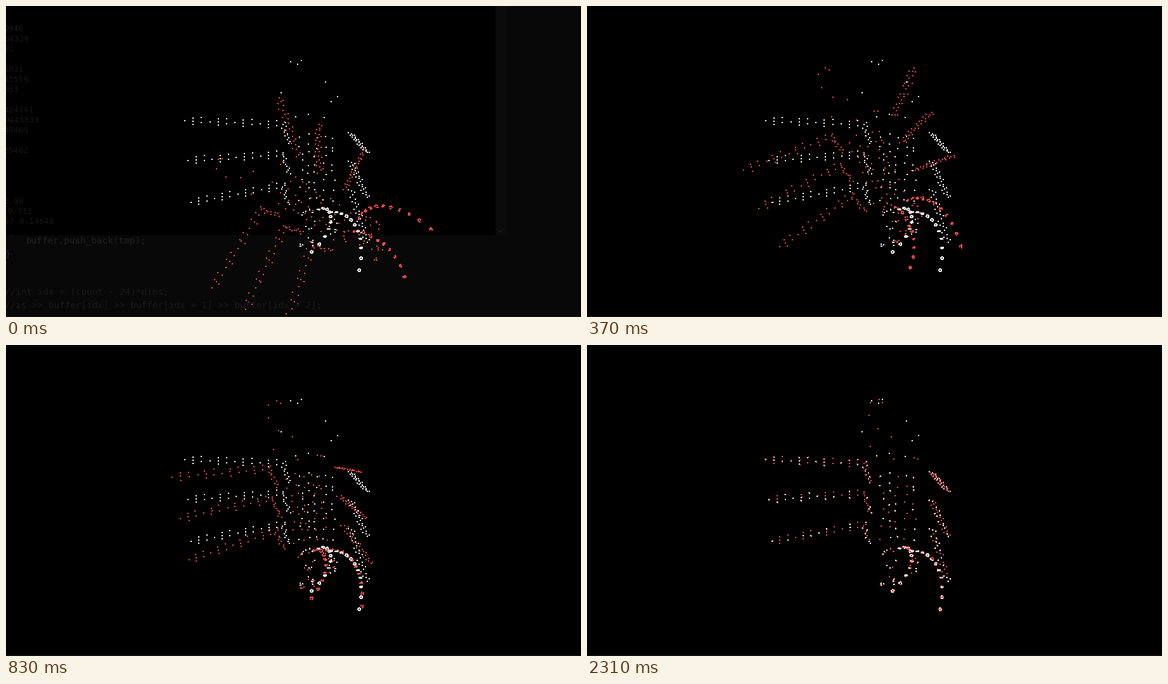
Recreate the animation shown at these times as a matplotlib script. Size 907 by 491 pixels, loop 2390 ms.

```python
import numpy as np
import matplotlib.pyplot as plt
from matplotlib.animation import FuncAnimation

W, H, DPI = 907, 491, 128
TICK, LOOP = 10, 2390
WHITE, RED = (255, 255, 255), (240, 76, 76)
CHANGES = [70, 140, 200, 290, 370, 430, 520,
           600, 670, 750, 830, 910, 980, 1060,
           1150, 1230, 1300]
rng = np.random.default_rng(4)

# Pose of the moving cloud at key steps: the two rows of its 2x3 projection,
# the sideways sag of the lower part, and where the pivot lies.
PIVOT = np.array([430, 260, 0])
KEYS = np.array([0, 3, 5, 9, 14], float)
POSES = np.array([
    [0.467, 0.785, 0.57, -0.83, 0.58, 0.76, 0.22, 457, 369],
    [0.80, 0.458, 0.10, -0.51, 0.897, 1.00, 0.22, 412, 302],
    [0.88, 0.307, 0.00, -0.388, 0.971, 0.82, 0.19, 402, 279],
    [0.95, 0.209, -0.10, -0.259, 1.028, 0.37, 0.06, 406, 277],
    [1, 0, 0, 0, 1, 0, 0, 430, 260]])
SLOPES = np.gradient(POSES, KEYS, axis=0, edge_order=2)
SLOPES[-1] = 0


def pose_at(step):
    """Cubic Hermite path through the key poses."""
    if step >= KEYS[-1]:
        return POSES[-1]
    k = np.searchsorted(KEYS, step, side="right") - 1
    h = KEYS[k + 1] - KEYS[k]
    u = (step - KEYS[k]) / h
    return ((1 + 2 * u) * (1 - u) ** 2 * POSES[k]
            + u * (1 - u) ** 2 * h * SLOPES[k]
            + u * u * (3 - 2 * u) * POSES[k + 1]
            + u * u * (u - 1) * h * SLOPES[k + 1])


def project(points, pose):
    xy = (points - PIVOT) @ pose[:6].reshape(2, 3).T + pose[7:]
    xy[:, 0] += pose[6] * np.maximum(points[:, 1] - 270, 0)
    return xy


# How white and red stack where the clouds coincide.
RED_OVER, WHITE_OVER, WHITE_FIRST = 0, 1, 2
RIBS = [(0,), (-5, 0, 5), (-6, 2)]


def finger(tip, root, side, stations=12):
    """Ribs of one to three points along an axis, spread along side."""
    tip, root, side = np.array(tip), np.array(root), np.array(side)
    return [tip + s * (root - tip) + off * side
            for i, s in enumerate(np.linspace(0, 1, stations))
            for off in RIBS[i % 3]]


def knuckle(x, y):
    """Loose column of points at the root of a finger."""
    rows = np.arange(-4, 30, 3)
    return [(x + rng.uniform(-4, 4) + max(r, 0) * 0.3, y + r, 0) for r in rows]


def arm(p0, p1, p2, p3, count, depth):
    """Small rings along a cubic curve, some of them seen edge-on."""
    points = []
    for i, t in enumerate(np.linspace(1, 0, count)):
        x, y = ((1 - t) ** 3 * np.array(p0) + 3 * t * (1 - t) ** 2 * np.array(p1)
                + 3 * t * t * (1 - t) * np.array(p2) + t ** 3 * np.array(p3))
        tall = 2 * abs(np.cos(i * 0.5))
        points += [(x + 2 * np.cos(a), y + tall * np.sin(a), depth(t))
                   for a in np.arange(7) * 2 * np.pi / 7 + 0.4]
    return points


def palm():
    """Jittered columns between the fingers."""
    return [(x + rng.uniform(-3, 3), y + rng.uniform(-5, 5), 0)
            for x in (465, 476, 488, 502, 516) for y in range(206, 312, 14)]


def blob(x, y, rx, ry, count):
    """Points scattered around a ring."""
    a = rng.uniform(0, 2 * np.pi, count)
    r = rng.uniform(0.5, 1, count)
    return list(zip(x + rx * r * np.cos(a), y + ry * r * np.sin(a),
                    np.full(count, -10)))


def build_cloud():
    points, layers = [], []

    def add(part, layer=None):
        points.extend(part)
        layers.extend(rng.integers(0, 2, len(part)) if layer is None
                      else [layer] * len(part))

    for n, (left, right) in enumerate([(181, 187), (244, 235), (310, 286)]):
        layer = WHITE_FIRST if n == 0 else None
        add(finger((282 + 5 * n, left, 0), (427, right, 0), (0, 1, 0)), layer)
        add(knuckle(437, 188 + 48 * n), layer)
        # The opposite finger points at the viewer.
        add(finger((570, 231 + 71 * n, -120), (545, 202 + 45 * n, -8),
                   (1, 0.4, 0), 14), layer)
    add(arm((513, 325), (540, 324), (571, 350), (557, 417), 11, lambda t: -4))
    add(arm((493, 321), (517, 310), (524, 352), (482, 388), 10,
            lambda t: 36 * min(1, 0.15 + 2 * t)))
    add(palm())
    add(blob(478, 336, 13, 16, 12))
    add(blob(475, 374, 13, 13, 9))
    add(blob(516, 348, 9, 14, 9))
    return np.array(points, float), np.array(layers)


# Stray points at the top belong to one cloud only.
TOP_STILL = [(449, 88), (460, 92), (466, 86), (504, 120), (434, 137),
             (523, 143), (513, 151), (457, 175), (477, 171), (502, 176)]
TOP_MOVING = np.array([(447, 91, 0), (461, 86, 0), (466, 91, 0), (445, 111, 0),
                       (459, 132, 0), (480, 145, 0), (447, 160, 0),
                       (484, 180, 0), (516, 178, 0), (522, 180, 0)], float)

cloud, layer = build_cloud()
wobble = rng.integers(-1, 2, (len(cloud), 2)) * (layer != RED_OVER)[:, None]


def stamp(img, points, color):
    for x, y in np.rint(np.asarray(points)[:, :2] - 0.9).astype(int):
        if 0 <= x < W - 1 and 0 <= y < H - 1:
            img[y:y + 2, x:x + 2] = color


def draw(step):
    img = np.zeros((H, W, 3), np.uint8)
    img[H - 1] = 28
    if step == 0:
        img[:362, 772:] = 8
        img[:362, 772:791] = 11
        img[362:H - 1] = 8
    pose = pose_at(step)
    white_over = layer == WHITE_OVER
    if step < len(CHANGES):
        white_over = white_over | (layer == WHITE_FIRST)
    stamp(img, cloud, WHITE)
    stamp(img, TOP_STILL, WHITE)
    stamp(img, project(cloud, pose) + wobble * 0.8, RED)
    stamp(img, project(TOP_MOVING, pose), RED)
    stamp(img, cloud[white_over], WHITE)
    return img


fig = plt.figure(figsize=(W / DPI, H / DPI), dpi=DPI, facecolor="black")
ax = fig.add_axes([0, 0, 1, 1])
ax.axis("off")
picture = ax.imshow(draw(0), interpolation="nearest", aspect="auto",
                    extent=(0, W, H, 0))
ax.set_xlim(0, W)
ax.set_ylim(H, 0)


def label(x, y, text, px, shade, ha="left"):
    return ax.text(x, y, text, fontsize=px * 72 / DPI, color=shade, ha=ha,
                   va="center_baseline", family="DejaVu Sans Mono",
                   clip_on=True)


# Faint windows behind the first picture; console lines are 16 px apart.
CONSOLE = [(0, 28, "9946"), (1, 36, "64329"), (2, 12, "91"),
           (4, 28, "8031"), (5, 36, "43559"), (6, 20, "933"),
           (8, 44, "424191"), (9, 52, "9443833"), (10, 36, "48469"),
           (12, 36, "35462"), (17, 28, "0.98"), (18, 42, "9.711"),
           (19, 76, "97 0.14648"), (20, 12, "_")]
EDITOR = [(32, 369, "buffer.push_back(tmp);"), (-2, 390, "}"),
          (-2, 451, "//int idx = (count - 24)*dims;"),
          (-2, 471, "//is >> buffer[idx] >> buffer[idx + 1] >> buffer[idx + 2];")]
ghosts = [label(x, 35 + 16 * row, s, 13, "#161616", "right")
          for row, x, s in CONSOLE]
ghosts += [label(x, y, s, 14.35, "#191919" if s.startswith("//") else "#202020")
           for x, y, s in EDITOR]
ghosts += ax.plot([777, 780, 783], [354, 357, 354], color="#1e1e1e", lw=0.6)

shown = [None]


def update(i):
    step = int(np.searchsorted(CHANGES, i * TICK, side="right"))
    if shown[0] != step:
        shown[0] = step
        picture.set_data(draw(step))
        for g in ghosts:
            g.set_visible(step == 0)
    return [picture, *ghosts]


anim = FuncAnimation(fig, update, frames=LOOP // TICK, interval=TICK,
                     repeat=True, repeat_delay=0, cache_frame_data=False)
plt.show()
```
